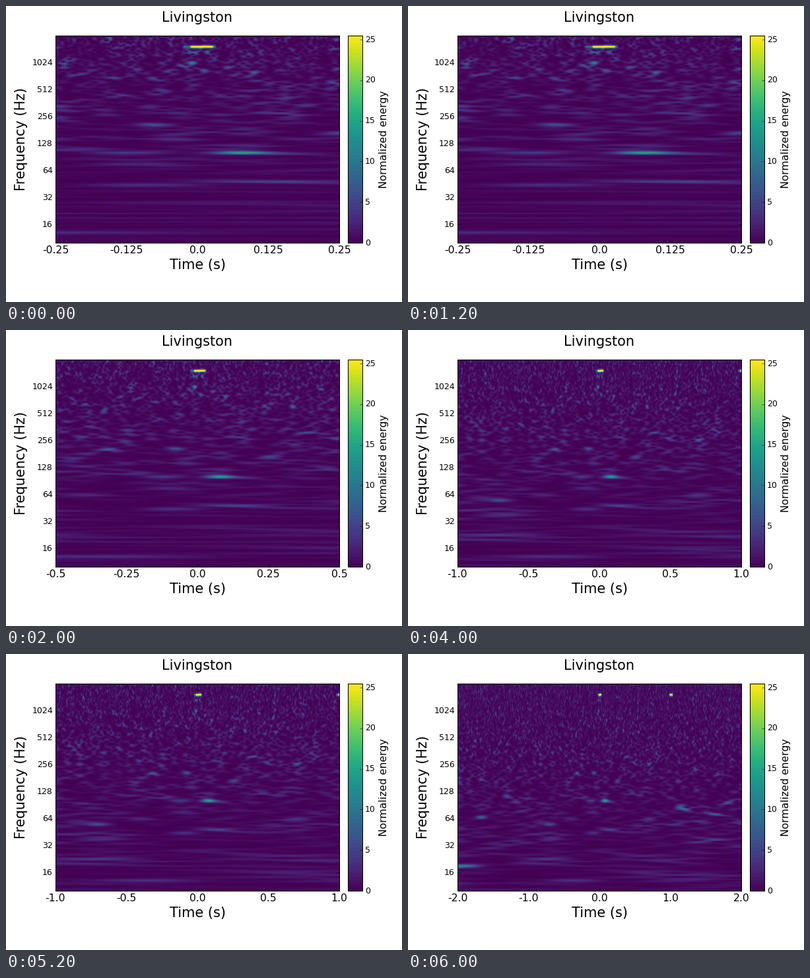
Recreate the animation shown at these times as a matplotlib script. Size 600 by 450 pixels, loop 8000 ms.

```python
import numpy as np
import matplotlib.pyplot as plt
from matplotlib.animation import FuncAnimation

plt.rcParams.update({
    "font.family": "DejaVu Sans",
    "axes.linewidth": 1.0,
    "axes.unicode_minus": False,
    "ytick.alignment": "center",
    "xtick.direction": "in", "ytick.direction": "in",
    "xtick.major.size": 4, "ytick.major.size": 4,
    "xtick.major.width": 0.5, "ytick.major.width": 0.5,
    "xtick.major.pad": 4, "ytick.major.pad": 4,
})

VIEWS = 4
F_LOW, F_HIGH = 10, 2048
ROWS, COLS, OVERSAMPLE = 315, 430, 3
Q = 45
DURATION, SAMPLES = 8, 8192             # length of the noise record
E_MAX = 25.5
BURST_FREQ, BURST_PERIOD = 1549, 1.004

# The few loud streaks: time (s), frequency (Hz), peak energy, stretch
STREAKS = [
    (0.079, 101, 11, 1), (-0.12, 101, 4, 1.6), (-0.01, 1024, 10, 1.8),
    (-0.08, 206, 5, 1.2), (-0.09, 44, 3.5, 1), (-0.35, 12.9, 3.5, 1),
    (-0.7, 55, 6, 1), (-1.95, 18.8, 11, 1), (-1.66, 66, 8, 1),
]

octaves = np.linspace(np.log2(F_LOW), np.log2(F_HIGH), ROWS)
freqs = 2 ** octaves


def half_span(view):
    """Seconds shown either side of zero; doubles with every view."""
    return 0.25 * 2 ** view


def noise_energy():
    """Constant-Q energy of white noise, one row per frequency."""
    rng = np.random.default_rng(11)
    bins = np.arange(DURATION * 2400)
    spectrum = rng.normal(size=bins.size) + 1j * rng.normal(size=bins.size)
    energy = np.empty((ROWS, SAMPLES))
    for row, f in enumerate(freqs):
        half = f * np.sqrt(11) / Q
        lo, hi = int((f - half) * DURATION), int((f + half) * DURATION) + 1
        x = (bins[lo:hi] / DURATION - f) / half
        window = np.clip(1 - x**2, 0, None) ** 2
        power = np.abs(np.fft.ifft(spectrum[lo:hi] * window, SAMPLES)) ** 2
        level = np.interp(octaves[row], [octaves[0], octaves[-1]], [0.65, 1.05])
        energy[row] = level * power / power.mean()
    return energy


def bell(x, center, sigma):
    return np.exp(-0.5 * ((x - center) / sigma) ** 2)


def plateau(t, start, stop, edge=0.0015):
    return 0.5 * (np.tanh((t - start) / edge) - np.tanh((t - stop) / edge))


def spectrogram(span, noise):
    count = COLS * OVERSAMPLE
    t = ((np.arange(count) + 0.5) / count * 2 - 1) * span
    clock = np.arange(SAMPLES) * DURATION / SAMPLES - DURATION / 2
    energy = np.array([np.interp(t, clock, row) for row in noise])
    for center, f, peak, stretch in STREAKS:
        streak = peak * bell(t, center, 3.17 * stretch / f)
        energy += np.outer(bell(octaves, np.log2(f), 0.045), streak)
    for start in (0, BURST_PERIOD):
        s = t - start
        pulse = 9 * plateau(s, -0.025, 0.032) + 18 * plateau(s, -0.012, 0.028)
        energy += np.outer(bell(octaves, np.log2(BURST_FREQ), 0.034), pulse)
    energy = np.minimum(energy, E_MAX)
    return energy.reshape(ROWS, COLS, OVERSAMPLE).mean(axis=2)


noise = noise_energy()
maps = [spectrogram(half_span(view), noise) for view in range(VIEWS)]

fig = plt.figure(figsize=(8, 6), dpi=75, facecolor="white")
full_width = 0.775 / 1.08               # colour bar 5 %, gap 3 %
ax = fig.add_axes([0.125, 0.2, COLS / 600, 0.7])
cax = fig.add_axes([0.125 + 1.03 * full_width, 0.2, 0.05 * full_width, 0.7])

image = ax.imshow(maps[0], origin="lower", aspect="auto", cmap="viridis",
                  vmin=0, vmax=E_MAX, interpolation="bilinear",
                  extent=[-1, 1, octaves[0], octaves[-1]])
ax.set_title("Livingston", fontsize=20, y=1.05, pad=5)
ax.set_xlabel("Time (s)", fontsize=20, labelpad=5)
ax.set_ylabel("Frequency (Hz)", fontsize=20, labelpad=6)
ax.set_yticks(range(4, 11), [str(2**n) for n in range(4, 11)])
ax.tick_params(axis="y", labelsize=12, right=True)
ax.tick_params(axis="x", labelsize=15, top=True)

bar = fig.colorbar(image, cax=cax, ticks=range(0, 26, 5))
bar.set_label("Normalized energy", fontsize=15, labelpad=5)
bar.ax.tick_params(labelsize=12)

TICKS = np.linspace(-1, 1, 5)


def update(view):
    image.set_data(maps[view])
    ax.set_xticks(TICKS, [str(float(k * half_span(view))) for k in TICKS])
    return [image]


anim = FuncAnimation(fig, update, frames=VIEWS, interval=2000,
                     init_func=lambda: update(0), repeat=True, blit=False)
plt.show()
```
